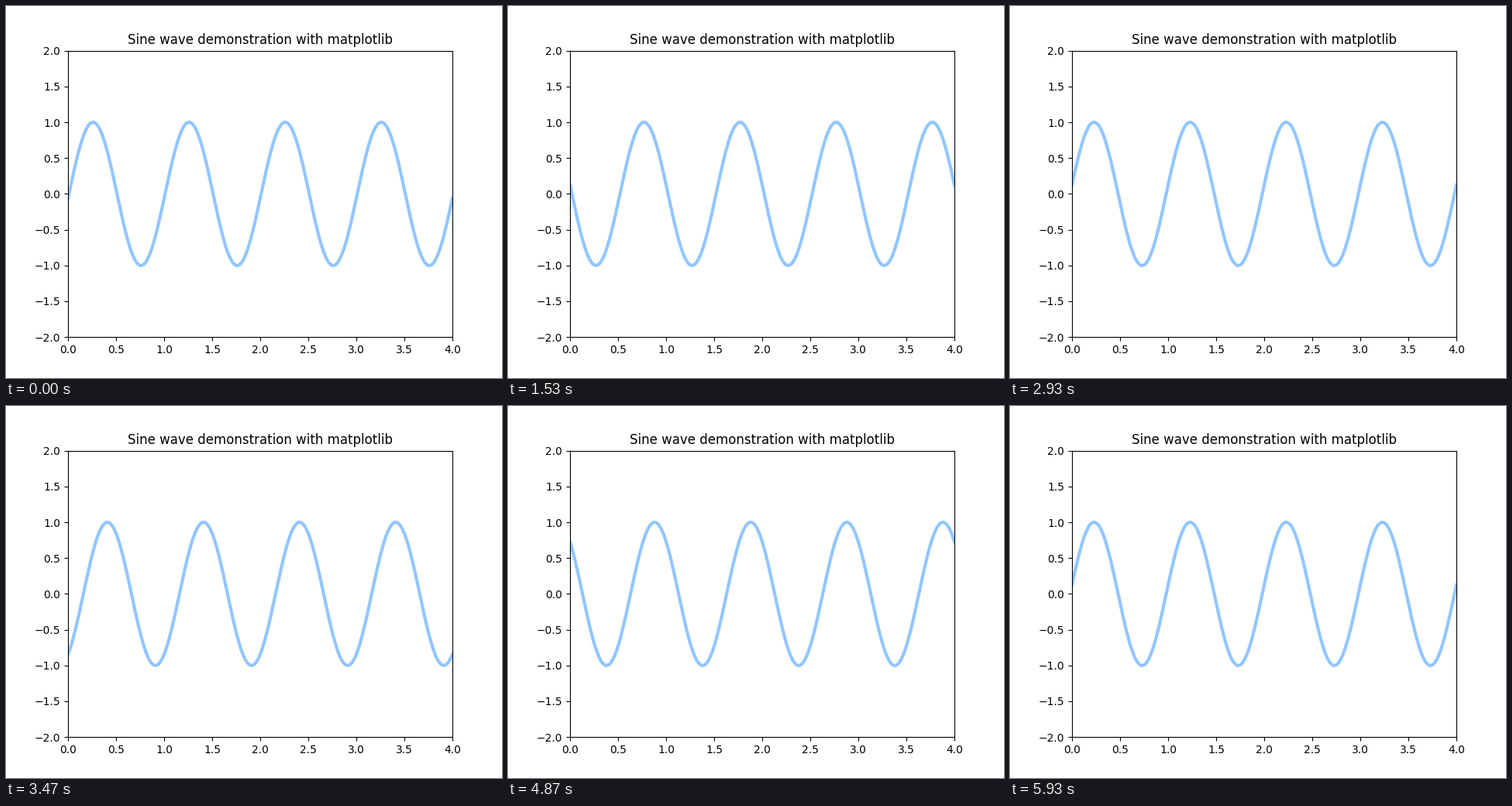
Recreate the animation shown at these times as a matplotlib script. Size 640 by 480 pixels, loop 5990 ms.

```python
import numpy as np
import matplotlib.pyplot as plt
from matplotlib.animation import FuncAnimation

LOOP_MS = 5990
FRAMES = 90
STEPS = 200  # fine wave steps in one loop

plt.rcParams["font.family"] = "DejaVu Sans"

fig, ax = plt.subplots(figsize=(6.4, 4.8), dpi=100)
ax.set(xlim=(0, 4), ylim=(-2, 2))
ax.set_title("Sine wave demonstration with matplotlib")

x = np.linspace(0, 4, 1000)
line, = ax.plot([], [], lw=3, color="#92C6FF")


def update(frame):
    # The wave moves in whole steps of 0.01, sampled at the playback rate.
    step = frame * STEPS // FRAMES + 1
    line.set_data(x, np.sin(2 * np.pi * (x - 0.01 * step)))
    return line,


anim = FuncAnimation(fig, update, frames=FRAMES, interval=LOOP_MS / FRAMES,
                     init_func=lambda: update(0), repeat=True,
                     repeat_delay=0, blit=False)
plt.show()
```
